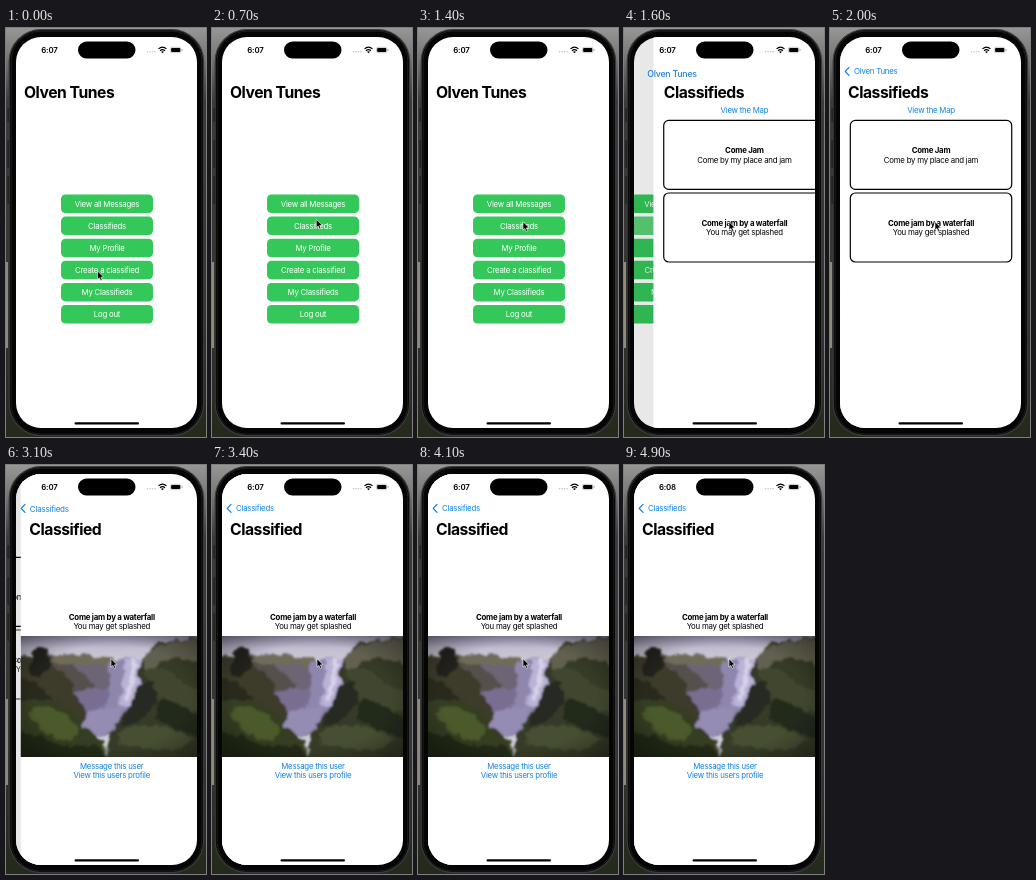
An HTML page for the animation above (5.23 s loop, 200 px wide and 409 px high).

```html
<!DOCTYPE html>
<html lang="en">
<head>
<meta charset="utf-8">
<title>App walkthrough</title>
<style>
  html, body { margin: 0; width: 100%; height: 100%; overflow: hidden; background: #222; }
  svg { display: block; width: 100vw; height: 100vh; }
  text { font: 400 7.83px Inter, Roboto, sans-serif; letter-spacing: -.03em; }
  .bold { font-weight: 700; }
  .semi { font-weight: 600; }
  .large { font-weight: 700; font-size: 15.7px; }
  .mid { text-anchor: middle; }
  .link { fill: #0f80e6; }
</style>
</head>
<body>
<svg id="stage" viewBox="0 0 200 409" preserveAspectRatio="none"></svg>
<script>
const LOOP = 5230, STEP = 100;
const LEFT = 10, WIDTH = 181;
const LINK = [15, 128, 230];
const stage = document.getElementById('stage');

const rect = (x, y, w, h, r, attrs) =>
  `<rect x="${x}" y="${y}" width="${w}" height="${h}" rx="${r}" ${attrs}/>`;
const path = (d, fill, attrs = '') => `<path d="${d}" fill="${fill}" ${attrs}/>`;
const text = (x, y, str, cls = '', attrs = '') =>
  `<text x="${x}" y="${y}" class="${cls}" ${attrs}>${str}</text>`;
const mid = (y, str, cls = '', attrs = '') => text(101, y, str, 'mid ' + cls, attrs);
const page = (id, body) =>
  `<g id="${id}">${rect(LEFT, 8, WIDTH, 394, 0, 'fill="#fff"')}${body}` +
  `${rect(LEFT, 8, WIDTH, 394, 0, `id="${id}Dim" opacity="0"`)}</g>`;

const button = (label, i) => {
  const y = 166.5 + i * 22.1;
  return `<g id="button${i}">${rect(55, y, 92, 18.5, 4.5, 'fill="#34c759"')}` +
    mid(y + 12.1, label, '', 'fill="#fff"') + '</g>';
};

const card = (id, y, title, note) =>
  `<g id="${id}">${rect(20.3, y, 161.4, 69, 5, 'fill="#fff" stroke="#000" stroke-width="1.2"')}` +
  mid(y + 32.7, title, 'bold') + mid(y + 42.1, note) + '</g>';

// Waterfall scene, drawn from the photo's own top left corner
const photo = `
  <g clip-path="url(#photoClip)"><g transform="translate(10 171)">
    ${rect(-5, -5, 192, 132, 0, 'fill="url(#sky)"')}
    <g filter="url(#rough)">
      ${path('M24 19 Q60 17 92 23 L102 24 V100 H24Z', '#6d6574')}
      ${path('M24 20 Q52 16 96 24 L90 30 Q66 26 50 30 L24 30Z', '#716c58')}
      ${path('M24 24 Q48 25 60 36 Q72 44 82 62 L60 96 H20Z', '#574f4c')}
      ${path('M44 62 Q66 44 92 56 L104 66 L98 92 L70 102 L52 92Z', '#796e92')}
      ${path('M89 26 Q104 21 121 23 Q122 44 114 66 L106 84 H80 Q90 58 89 26Z', '#8f86ad')}
      ${path('M103 24 L120 23 Q120 46 111 68 L98 72 Q104 48 103 24Z', '#bab3d6')}
      ${path('M111 24 L115 24 Q115 44 108 64 L104 64 Q111 44 111 24Z', '#d8d3ea')}
      ${path('M58 84 Q76 68 100 72 L98 92 Q86 102 70 100Z', '#958cb4')}
      ${path('M118 26 Q126 18 133 10 Q140 3 158 4 L187 0 V127 H84 Q86 98 98 84 Q112 68 118 48Z', '#353a28')}
      ${path('M121 24 Q134 8 152 6 L187 2 V30 Q160 18 142 24 L126 40Z', '#626150')}
      ${path('M124 36 Q140 26 152 38 Q166 52 187 56 V78 Q150 72 132 60Z', '#41462f')}
      ${path('M118 48 L130 44 L138 66 L118 84 L100 92Z', '#262b20')}
      ${path('M140 62 Q160 66 187 88 V104 Q158 96 136 84Z', '#24291c')}
      ${path('M96 96 Q120 84 148 92 L176 104 L150 114 L100 110Z', '#465030')}
      ${path('M-5 24 Q4 20 12 19 L11 14 L18 11 L30 14 L28 20 L33 30 Q46 38 54 56 L66 78 L60 96 L-5 100Z', '#3c3b2c')}
      ${path('M11 14 L18 11 L29 14 L28 22 L31 31 L20 42 L6 38 L12 26Z', '#24231d')}
      ${path('M-5 42 Q12 40 22 54 L34 68 L20 76 L-5 68Z', '#2a2c1f')}
      ${path('M-5 66 Q20 58 40 68 Q58 76 64 92 L82 104 L86 127 H-5Z', '#343e22')}
      ${path('M8 76 Q24 66 40 76 L58 92 L50 106 L22 96Z', '#4b5a2c')}
      ${path('M-5 96 Q20 98 42 110 L74 108 L92 127 H-5Z', '#232a19')}
    </g>
    ${rect(0, 0, 181, 121, 0, 'fill="url(#vignette)"')}
  </g></g>`;

stage.innerHTML = `
  <defs>
    <clipPath id="screen">${rect(LEFT, 9, WIDTH, 391, 25, '')}</clipPath>
    <clipPath id="photoClip">${rect(LEFT, 171, WIDTH, 121, 0, '')}</clipPath>
    <clipPath id="labelClip">${rect(20, 34, 171, 20, 0, '')}</clipPath>
    <filter id="rough" x="-5%" y="-5%" width="110%" height="110%">
      <feTurbulence type="fractalNoise" baseFrequency=".12" numOctaves="3" seed="4"/>
      <feDisplacementMap in="SourceGraphic" scale="9" xChannelSelector="R" yChannelSelector="G"/>
      <feGaussianBlur stdDeviation=".8"/>
    </filter>
    <linearGradient id="sky" x2="0" y2="1">
      <stop offset=".03" stop-color="#857d98"/><stop offset=".13" stop-color="#c2bdd0"/>
      <stop offset=".24" stop-color="#d0ccd9"/>
    </linearGradient>
    <radialGradient id="vignette" r=".72">
      <stop offset=".6" stop-opacity="0"/><stop offset="1" stop-opacity=".4"/>
    </radialGradient>
    <linearGradient id="desk" x2="0" y2="1">
      <stop stop-color="#969694"/><stop offset=".06" stop-color="#7d7d7b"/>
      <stop offset=".18" stop-color="#3b3c3a"/><stop offset=".7" stop-color="#34352f"/>
      <stop offset="1" stop-color="#222a1b"/>
    </linearGradient>
  </defs>
  ${rect(0, 0, 200, 409, 0, 'fill="url(#desk)"')}
  ${rect(0, 234, 2, 86, 0, 'fill="#8f8a7c"')}
  ${[[80, 14], [112, 28], [148, 28]].map(([y, h]) => rect(1.6, y, 3, h, 1, 'fill="#161616"')).join('')}
  ${rect(3.2, 1.6, 194.4, 406, 32, 'fill="#050505" stroke="#3a3b3c" stroke-width="1.2"')}
  ${rect(5.2, 3.2, 190.6, 402.8, 29.5, 'fill="none" stroke="#1d1d1e" stroke-width="1"')}
  <g clip-path="url(#screen)">
    ${page('menu', ['View all Messages', 'Classifieds', 'My Profile', 'Create a classified',
      'My Classifieds', 'Log out'].map(button).join(''))}
    ${page('list', mid(85, 'View the Map', 'link') +
      card('card0', 92.4, 'Come Jam', 'Come by my place and jam') +
      card('card1', 165, 'Come jam by a waterfall', 'You may get splashed'))}
    ${page('detail', mid(154.8, 'Come jam by a waterfall', 'bold') + mid(164, 'You may get splashed') +
      photo + mid(303.7, 'Message this user', 'link') + mid(313.2, 'View this users profile', 'link'))}
    <g id="homeBox">${text(0, 0, 'Olven Tunes', '', 'id="homeTitle"')}</g>
    ${text(0, 0, 'Classifieds', '', 'id="listTitle"')}
    ${text(18, 70.1, 'Classified', 'large', 'id="detailTitle"')}
    <path id="chevron" d="M19 39.4 L15.2 43.4 L19 47.4" fill="none" stroke="#0f80e6" stroke-width="1.3"
      stroke-linecap="round" stroke-linejoin="round"/>
    ${text(43.4, 24.8, '', 'mid semi', 'id="clock"')}
    ${[141.5, 144, 146.5, 149].map(x => `<circle cx="${x}" cy="23.8" r=".8" fill="#c4c4c6"/>`).join('')}
    <path d="M152.5 20.9 Q156.5 17.4 160.5 20.9 M154 22.7 Q156.5 20.5 159 22.7" fill="none"
      stroke="#000" stroke-width="1.2"/>
    ${path('M155 23.7 Q156.5 22.6 158 23.7 L156.5 25.3Z', '#000')}
    ${rect(164.4, 19.3, 10.6, 5.4, 1.6, 'fill="#fff" stroke="#999" stroke-width=".5"')}
    ${rect(165.1, 20, 9.2, 4, 1, '')}
    ${rect(175.7, 21.1, .8, 1.8, .4, 'fill="#999"')}
    ${rect(68.5, 394.3, 64.5, 2.3, 1.15, '')}
  </g>
  ${rect(72, 13.4, 57.5, 17.2, 8.6, '')}
  <path id="cursor" d="M0 0 V8.4 L1.9 6.7 L3.2 9.7 L4.7 9.1 L3.4 6.2 L6 6Z" fill="#000" stroke="#fff"
    stroke-width=".6" stroke-linejoin="round"/>`;

const el = id => document.getElementById(id);
const clamp = v => Math.max(0, Math.min(1, v));
const mix = (a, b, k) => a + (b - a) * k;
const smooth = k => k * k * (3 - 2 * k);
const set = (id, name, value) => el(id).setAttribute(name, value);
const shift = (id, x, y = 0) => set(id, 'transform', `translate(${x} ${y})`);

// Critically damped spring, 0 to 1
function spring(ms) {
  const x = Math.max(0, ms) * .019;
  return 1 - (1 + x) * Math.exp(-x);
}

// Large title shrinks into the blue back label
function morph(id, p, dx) {
  const q = Math.pow(p, 1.2), style = el(id).style;
  shift(id, mix(18, 24, q) + dx, mix(70.1, 46.2, q));
  style.fontSize = mix(15.7, 7.83, q) + 'px';
  style.fontWeight = Math.round(mix(7, 4, q * q)) * 100;
  style.fill = `rgb(${LINK.map(c => c * q)})`;
  style.opacity = 1 - q * (1 - q);
}

function push(from, to, p) {
  shift(from, -.3 * WIDTH * p);
  shift(to, WIDTH * (1 - p));
  set(from + 'Dim', 'opacity', .1 * p);
}

function draw(time) {
  const t = Math.floor(time / STEP) * STEP;
  const p1 = spring(t - 1400), p2 = spring(t - 2810);

  push('menu', 'list', p1);
  push('list', 'detail', p2);
  if (p2 === 0) shift('list', WIDTH * (1 - p1));
  set('button1', 'opacity', 1 - .2 * clamp((t - 1380) / 200));
  set('card1', 'opacity', 1 - .2 * clamp((t - 2800) / 100));

  morph('homeTitle', p1, -49 * p2);
  morph('listTitle', p2, 1.12 * WIDTH * (1 - p1));
  shift('detailTitle', 1.12 * WIDTH * (1 - p2));
  // The old label leaves under the chevron
  set('homeBox', 'opacity', 1 - p2);
  set('homeBox', 'clip-path', p2 > 0 ? 'url(#labelClip)' : 'none');
  set('chevron', 'opacity', clamp((p1 - .9) * 11));

  const go = smooth(clamp(t / 600)), settle = smooth(clamp((t - 600) / 300));
  shift('cursor', mix(91.5, 104, go) + settle, mix(243, 190.5, go) + 3.2 * settle);
  el('clock').textContent = t < 4900 ? '6:07' : '6:08';
}

const start = performance.now();
function tick() {
  draw((performance.now() - start) % LOOP);
  requestAnimationFrame(tick);
}
tick();
</script>
</body>
</html>
```
